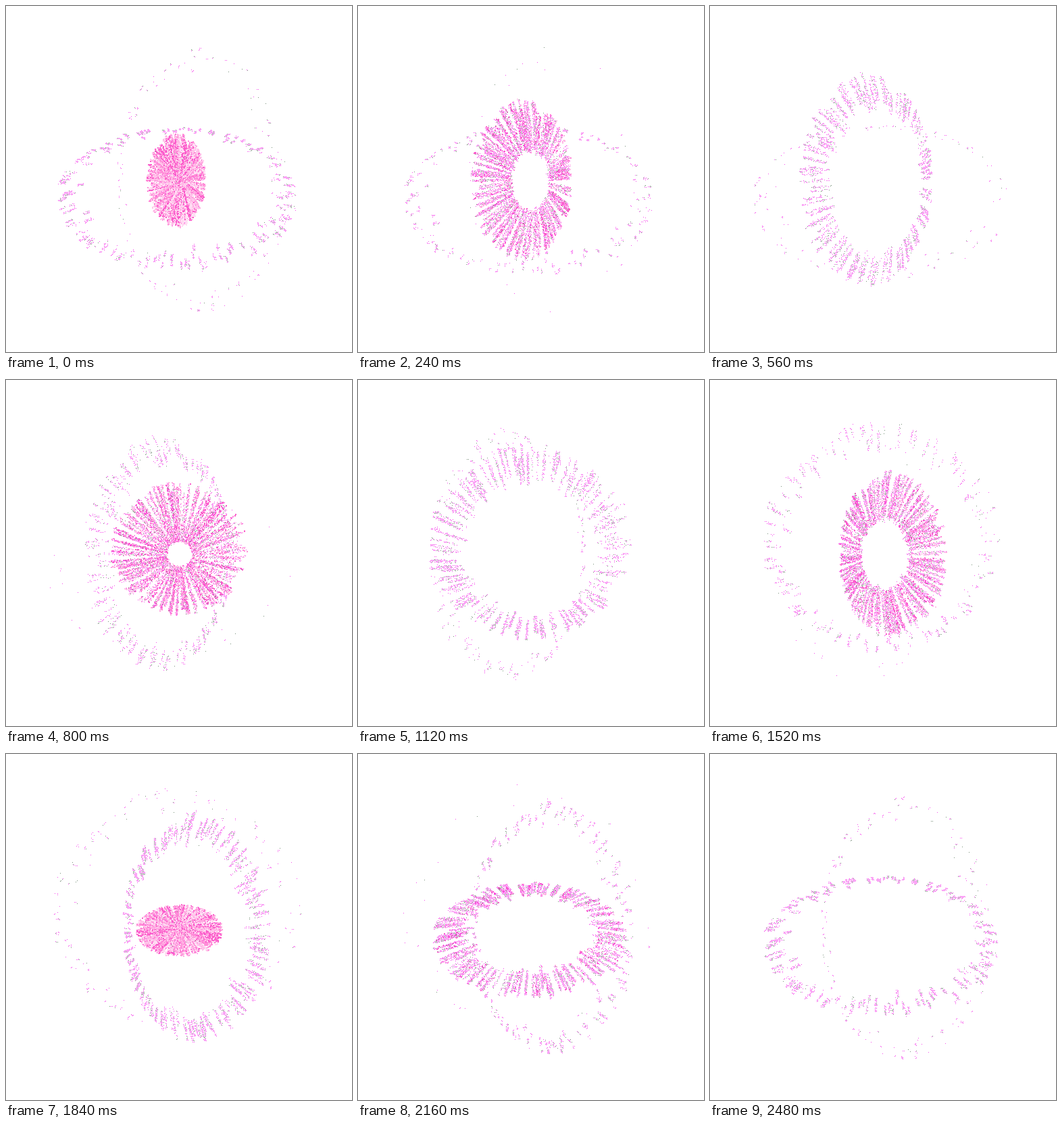
An HTML page with a canvas for the animation above (2.56 s loop, 512 px wide and 512 px high).

```html
<!DOCTYPE html>
<html lang="en">
<head>
<meta charset="utf-8">
<title>Ring bursts</title>
<style>
  html, body { margin: 0; width: 100%; height: 100%; overflow: hidden; background: #fff; }
  canvas { display: block; width: 512px; height: 512px; }
</style>
</head>
<body>
<canvas id="stage" width="512" height="512"></canvas>
<script>
const ctx = document.getElementById('stage').getContext('2d');
const LOOP = 2560, STEP = 80, CX = 256, CY = 257;
const STREAKS = 160, TRAIL = 84, TRAIL_DELAY = 0.64;
const PINKS = ['#ffdcf3', '#ffc4ea', '#ffaee2', '#ff8cd8', '#fb5ccb'];
const MAGENTA = '#f64cec', GREY = '#78907a';

let seed = 7;
function random() {
  seed = (seed + 0x6D2B79F5) | 0;
  let n = Math.imul(seed ^ (seed >>> 15), seed | 1);
  n ^= n + Math.imul(n ^ (n >>> 7), n | 61);
  return ((n ^ (n >>> 14)) >>> 0) / 4294967296;
}
const pick = list => list[Math.floor(random() * list.length)];

// Tilted rings: final radii, perspective shift of the centre, drag and head start
const bursts = [
  { start: 0,    rx: 127, ry: 202, dx: -42, dy: 0,   drag: 0.0020, lead: 0.43 },
  { start: 640,  rx: 195, ry: 187, dx: -5,  dy: -31, drag: 0.0024, lead: 0.37 },
  { start: 1280, rx: 131, ry: 200, dx: 37,  dy: 0,   drag: 0.0030, lead: 0.26 },
  { start: 1840, rx: 194, ry: 116, dx: -4,  dy: 33,  drag: 0.0031, lead: 0.41 }
];

function makeDots() {
  const dots = [];
  let strength = 1;
  for (let i = 0; i < STREAKS; i++) {
    if (random() < 0.4) strength = 0.4 + random() * 1.3;
    const angle = (i + random() * 3) / STREAKS * Math.PI * 2;
    const speed = 0.8 + 0.2 * Math.sqrt(random());
    const tone = pick(PINKS);
    for (let j = 0; j < TRAIL; j++) {
      dots.push({
        cos: Math.cos(angle), sin: Math.sin(angle), speed,
        delay: TRAIL_DELAY * (j + random()) / TRAIL,
        side: (random() - 0.5) * 3,
        fade: random() / strength,
        glow: random(),
        pink: random() < 0.6 ? tone : pick(PINKS),
        color: random() < 0.2 ? GREY : MAGENTA
      });
    }
  }
  return dots;
}
bursts.forEach(burst => burst.dots = makeDots());

function drawBurst(b, time) {
  const age = (time - b.start + LOOP) % LOOP;
  const travel = b.lead + b.drag * age;
  const visible = 1.6 * Math.exp(-age / 300) - 0.008;
  const glow = 0.95 * Math.max(0, 1 - age / 480) ** 2;
  if (visible <= 0) return;
  for (const d of b.dots) {
    if (d.delay > travel || (age > 0 && d.fade > visible)) continue;
    const r = d.speed * (1 - Math.exp(d.delay - travel));
    const x = Math.round(CX + b.rx * r * d.cos + b.dx * r * r - d.side * d.sin);
    let y = Math.round(CY + b.ry * r * d.sin + b.dy * r * r + d.side * d.cos);
    if (d.glow < glow) {
      ctx.fillStyle = d.pink;
      ctx.fillRect(x, y, 2, 2);
    } else {
      y += (x + y) & 1;
      ctx.fillStyle = d.color;
      ctx.fillRect(x, y, 1, 1);
    }
  }
}

function draw(now) {
  const time = Math.floor((now % LOOP) / STEP) * STEP;
  ctx.fillStyle = '#fff';
  ctx.fillRect(0, 0, 512, 512);
  bursts.forEach(burst => drawBurst(burst, time));
}

let origin;
function tick(now) {
  origin ??= now;
  draw(now - origin);
  requestAnimationFrame(tick);
}
draw(0);
requestAnimationFrame(tick);
</script>
</body>
</html>
```
